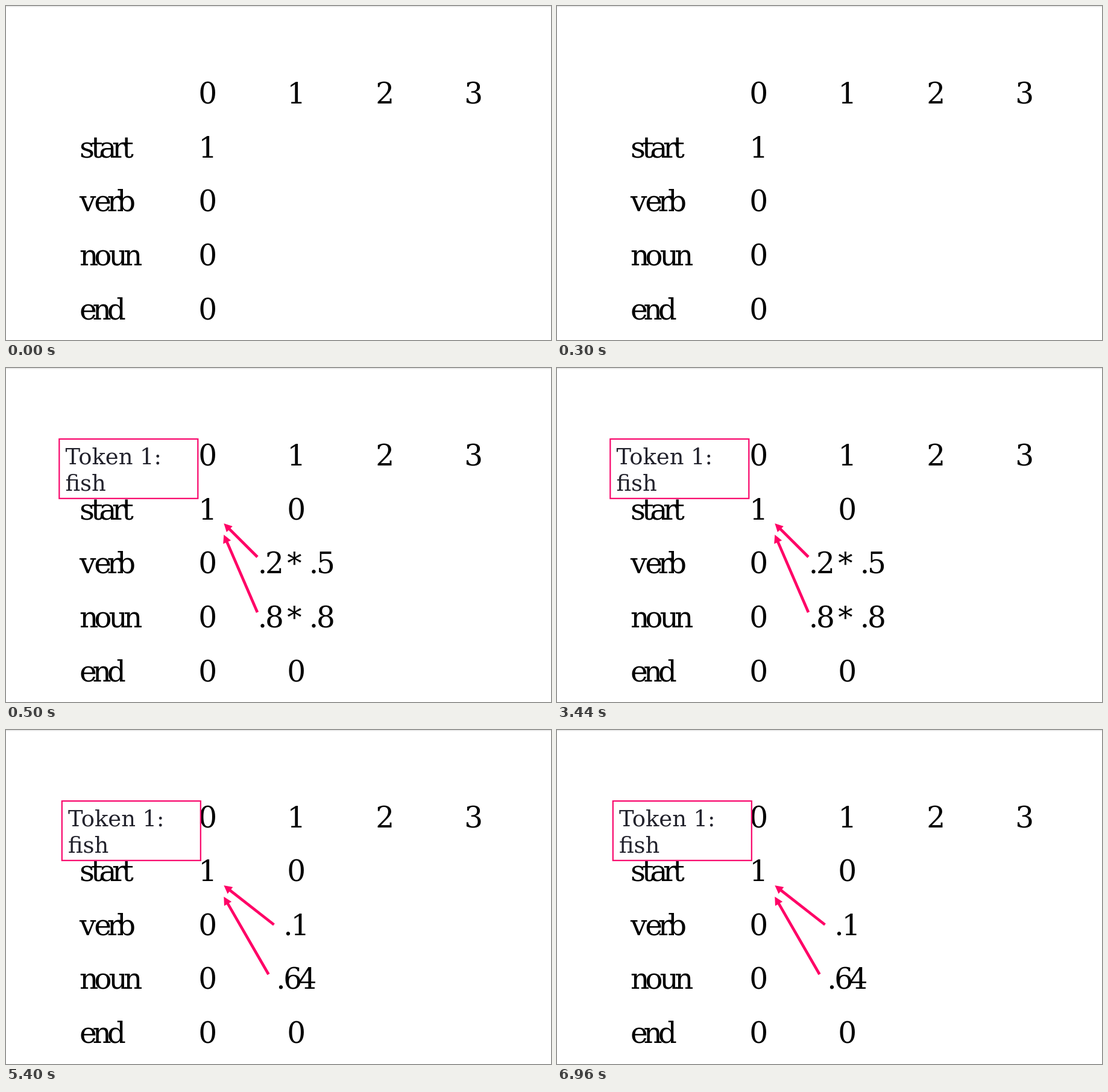
Recreate the animation shown at these times as an HTML page. Size 904 by 555 pixels, loop 8000 ms.

```html
<!DOCTYPE html>
<html lang="en">
<head>
<meta charset="utf-8">
<style>
  html, body { margin: 0; width: 100%; height: 100%; overflow: hidden; background: #fff; }
  svg { display: block; width: 904px; height: 555px; font-family: "DejaVu Serif", serif; }
  .cell { font-size: 48.6px; }
  .token { font-size: 36.9px; fill: #22222c; }
  .box { fill: none; stroke: #f8056a; stroke-width: 2.2; }
  .shaft { stroke: #f06; stroke-width: 4.6; }
  .head { fill: #f06; }
</style>
</head>
<body>
<svg id="stage" viewBox="0 0 904 555"></svg>
<script>
const LOOP = 8000;
const STARTS = [0, 500, 5400];
const SIZE = 48.6;
const stage = document.getElementById("stage");

// Table glyphs are DejaVu Serif spaced with the narrower Times metrics.
const metrics = document.createElement("canvas").getContext("2d");
metrics.font = '1000px "Liberation Serif", serif';
metrics.fontKerning = "none";
const advance = str => metrics.measureText(str).width * SIZE / 1000;

const text = (x, y, str, cls) => `<text x="${x}" y="${y}" class="${cls}">${str}</text>`;

function cell(x, y, content) {
  const str = String(content);
  const xs = [...str].map((_, i) => x + advance(str.slice(0, i)));
  return text(xs.join(" "), y, str, "cell");
}

function column(index, y, content) {
  const center = 331.5 + 147 * index;
  return cell(center - advance(String(content)) / 2, y, content);
}

function arrow(x1, y1, x2, y2) {
  const angle = Math.atan2(y2 - y1, x2 - x1);
  const baseX = x2 - 11 * Math.cos(angle), baseY = y2 - 11 * Math.sin(angle);
  return `<line class="shaft" x1="${x1}" y1="${y1}" x2="${baseX}" y2="${baseY}"/>
    <path class="head" d="M0 0L-13.5 7V-7Z"
      transform="translate(${x2} ${y2}) rotate(${angle * 180 / Math.PI})"/>`;
}

function token(x) {
  return `<rect class="box" x="${x}" y="118" width="230" height="98.8"/>` +
    text(x + 10.2, 160, "Token 1:", "token") + text(x + 10.2, 204, "fish", "token");
}

function table(rows) {
  const header = [0, 1, 2, 3].map(n => column(n, 162, n)).join("");
  const labels = ["start", "verb", "noun", "end"];
  return header + labels.map((label, i) =>
    cell(122, rows[i], label) + column(0, rows[i], i ? 0 : 1)).join("");
}

function scene(step) {
  const rows = step < 2 ? [252, 341, 431, 521] : [251, 341, 430, 520];
  let out = `<rect width="904" height="1.5" fill="#e6e6e6"/>` + table(rows);
  if (step === 0) return out;

  const values = step === 1 ? [0, ".2 * .5", ".8 * .8", 0] : [0, ".1", ".64", 0];
  out += values.map((value, i) => column(1, rows[i], value)).join("");
  out += step === 1
    ? arrow(417, 314, 361.3, 258.3) + arrow(417, 406, 361.3, 277)
    : arrow(444.5, 323.5, 361.3, 258.3) + arrow(435.5, 406, 361.3, 277);
  return out + token(step === 1 ? 88.3 : 92.8);
}

let shown = -1;
function draw(now) {
  const time = now % LOOP;
  const step = STARTS.filter(start => start <= time).length - 1;
  if (step !== shown) stage.innerHTML = scene(shown = step);
  requestAnimationFrame(draw);
}
draw(performance.now());
</script>
</body>
</html>
```
